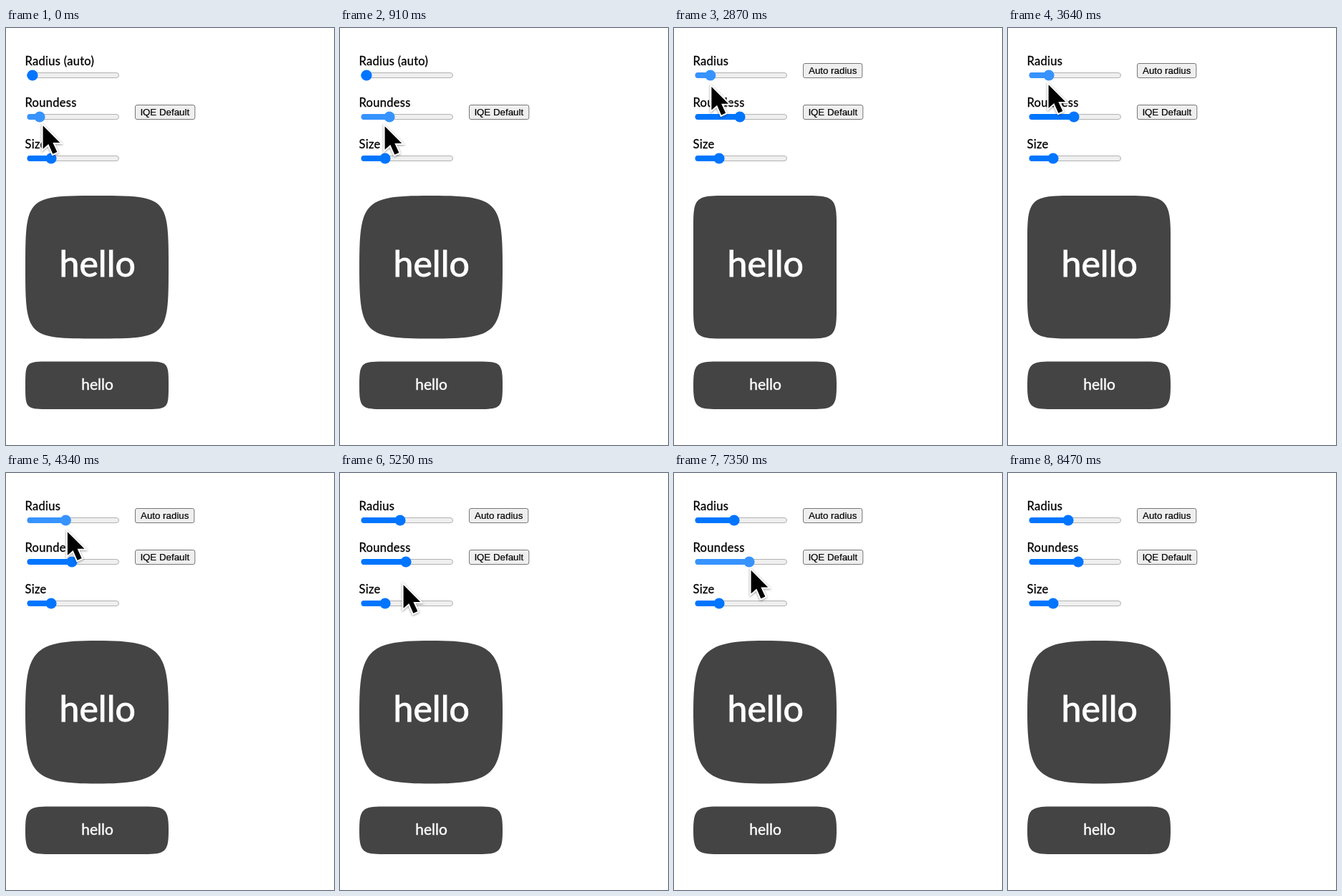
Animation, 458 px wide and 582 px high, one loop 8.82 s. Source, as an HTML page:

```html
<!DOCTYPE html>
<html lang="en">
<head>
<meta charset="utf-8">
<title>Squircle controls</title>
<style>
  html, body { margin: 0; width: 100%; height: 100%; overflow: hidden; background: #fff; }
  svg { display: block; width: 458px; height: 582px; }
  .label { font: 16.5px Lato, sans-serif; letter-spacing: .3px; stroke: #000; stroke-width: .3px; }
  .hello { font-family: Lato, sans-serif; fill: #fff; text-anchor: middle; stroke: #fff; stroke-width: .02em; }
  .button text { font: 13.333px "Liberation Sans", Arial, sans-serif; stroke: #000; stroke-width: .2px; }
  .button rect { fill: #efefef; stroke: #767676; rx: 2.5px; }
  .track { fill: #efefef; stroke: #b2b2b2; }
  .slider { --accent: #0075ff; }
  .slider.active { --accent: #3793ff; }
  .fill, .thumb { fill: var(--accent); }
  #cursor { filter: drop-shadow(0 1.5px 1.5px rgba(0, 0, 0, .4)); }
</style>
</head>
<body>
<svg viewBox="0 0 458 582">
  <text class="label" id="radiusLabel" x="26.5" y="52.3">Radius (auto)</text>
  <text class="label" x="26.5" y="110.3">Roundess</text>
  <text class="label" x="26.5" y="168.3">Size</text>

  <g id="sliders"></g>

  <g class="button" id="autoButton">
    <rect x="180.5" y="49.5" width="82.3" height="20"/>
    <text x="188" y="64.3">Auto radius</text>
  </g>
  <g class="button">
    <rect x="180.5" y="107.5" width="83.3" height="20"/>
    <text x="188" y="122.3">lQE Default</text>
  </g>

  <path id="bigBox" transform="translate(27 234)" fill="#444"/>
  <text class="hello" x="127.7" y="346.5" font-size="50">hello</text>
  <path id="smallBox" transform="translate(27 465.5)" fill="#444"/>
  <text class="hello" x="127.5" y="504.5" font-size="21">hello</text>

  <g id="cursor">
    <path transform="translate(-.5 1.5) scale(1.1)"
          d="M1 2.5V32L8 26L13.5 38.5L19 36L13.5 24H22.5Z"
          fill="#000" stroke="#fff" stroke-width="3.6" paint-order="stroke"/>
  </g>
</svg>
<script>
const LOOP = 8820, STEP = 70;
const MIN_X = 37, MAX_X = 150;
const AUTO_END = 2660, CURSOR_JUMP = 8120, CURSOR_END = 8190;
const $ = id => document.getElementById(id);

// Each row: time in ms, then the values reached at that time.
const radiusKeys = [[2590, MIN_X], [3220, 70], [3640, 57], [4410, 84]];
const roundKeys = [
  [0, 47], [490, 88], [910, 69], [1120, 60], [1540, 92],
  [6020, 92], [6370, MIN_X], [6510, 43], [7000, 112], [7700, 98]
];
const cursorKeys = [
  [0, 51, 132], [490, 92, 133], [910, 62, 133], [1120, 60, 133],
  [1540, 94, 133], [1750, 94, 133], [2030, 38, 80], [2590, 38, 79],
  [3220, 71, 76], [3640, 56, 75], [4410, 86, 78], [4900, 86, 78],
  [5250, 88, 152], [5880, 92, 132], [6020, 92, 132], [6300, 38, 132],
  [6510, 51, 129], [7000, 114, 131], [7700, 100, 132]
];

function sample(keys, t) {
  const next = keys.findIndex(k => k[0] > t);
  if (next === 0) return keys[0].slice(1);
  if (next < 0) return keys[keys.length - 1].slice(1);
  const a = keys[next - 1], b = keys[next];
  const p = (t - a[0]) / (b[0] - a[0]);
  const eased = p * p * (3 - 2 * p);
  return a.slice(1).map((v, i) => v + (b[i + 1] - v) * eased);
}

function addSlider(y) {
  const g = document.createElementNS("http://www.w3.org/2000/svg", "g");
  g.setAttribute("class", "slider");
  g.innerHTML = `
    <rect class="track" x="30" y="${y - 3.5}" width="127.5" height="7" rx="3.5"/>
    <rect class="fill" x="29.5" y="${y - 4}" height="8" rx="4"/>
    <circle class="thumb" cy="${y}" r="7.6"/>`;
  $("sliders").append(g);
  const fill = g.querySelector(".fill"), thumb = g.querySelector(".thumb");
  return (x, active) => {
    fill.setAttribute("width", x - 29.5);
    thumb.setAttribute("cx", x);
    g.classList.toggle("active", active);
  };
}

function squircle(w, h, radius, roundness) {
  const r = Math.min(radius, w / 2, h / 2);
  const c = r * roundness;
  return `M${r} 0H${w - r}C${w - c} 0 ${w} ${c} ${w} ${r}
    V${h - r}C${w} ${h - c} ${w - c} ${h} ${w - r} ${h}
    H${r}C${c} ${h} 0 ${h - c} 0 ${h - r}
    V${r}C0 ${c} ${c} 0 ${r} 0Z`;
}

const setRadius = addSlider(66), setRound = addSlider(124), setSize = addSlider(182);
setSize(63, false);

function draw(t) {
  const [radiusX] = sample(radiusKeys, t);
  const [roundX] = sample(roundKeys, t);
  const auto = t < AUTO_END;
  setRadius(radiusX, t >= 2590 && t < 4480);
  setRound(roundX, t < 1680 || (t >= 5950 && t < CURSOR_JUMP));

  $("radiusLabel").textContent = auto ? "Radius (auto)" : "Radius";
  $("autoButton").style.display = auto ? "none" : "";

  const radius = auto ? Infinity : (radiusX - MIN_X) * 2.8;
  const roundness = (roundX - MIN_X) / (MAX_X - MIN_X) / 4;
  $("bigBox").setAttribute("d", squircle(200, 199.5, radius, roundness));
  $("smallBox").setAttribute("d", squircle(200, 66.5, radius, roundness));

  const [x, y] = t < CURSOR_JUMP ? sample(cursorKeys, t) : [347, 115];
  $("cursor").setAttribute("transform", `translate(${x} ${y})`);
  $("cursor").style.display = t < CURSOR_END ? "" : "none";
}

const start = performance.now();
function tick() {
  const t = (performance.now() - start) % LOOP;
  draw(Math.floor(t / STEP) * STEP);
  requestAnimationFrame(tick);
}
tick();
</script>
</body>
</html>
```
